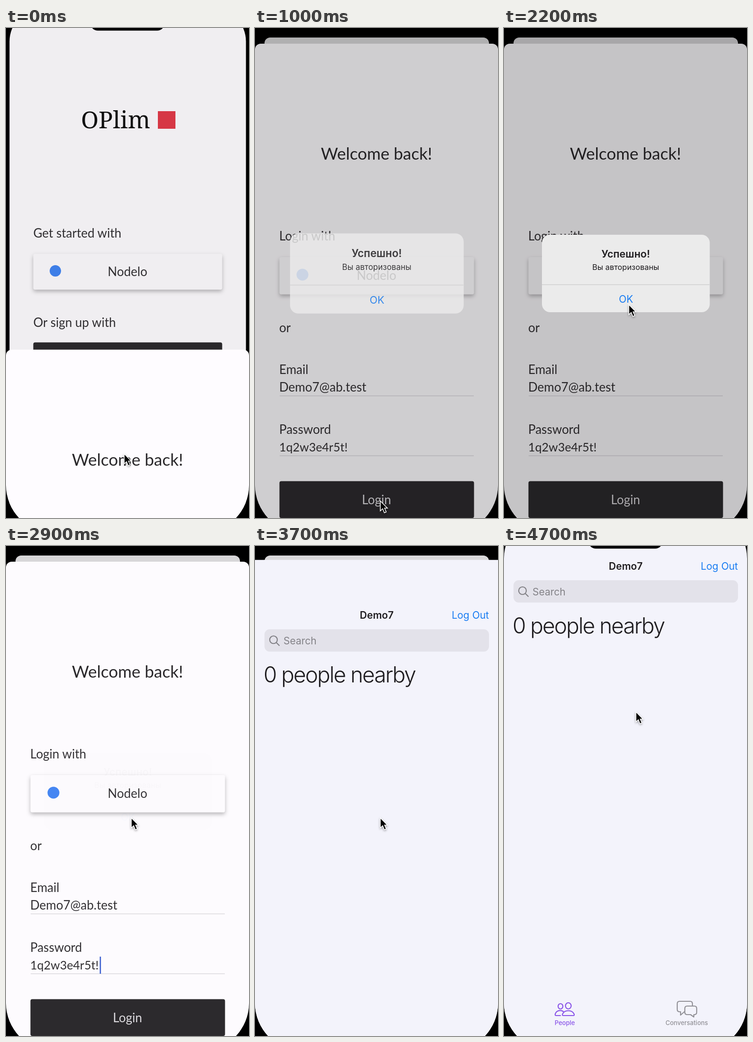
Write an HTML page that moves like this. It is 512 px wide and 1031 px high and loops after 4.8 s.

```html
<!DOCTYPE html>
<html lang="en">
<head>
<meta charset="utf-8">
<title>Chat login</title>
<style>
  html, body { margin: 0; width: 100%; height: 100%; overflow: hidden; background: #000; }
  svg { display: block; width: 100%; height: 100%; }
  text { fill: #1f1d20; }
  .form text { font: 26px Lato, sans-serif; fill: #333134; }
  .form .big { font-size: 35px; fill: #2a282b; }
  .form .logo { font: 50px "Noto Serif", serif; fill: #111; }
  .form .light { fill: #dddbdf; }
  .ui text { font: 21px Inter, sans-serif; }
  .ui .tab { font-size: 13px; font-weight: 500; }
  .ui .head { font-size: 46px; font-weight: 300; letter-spacing: -2px; }
  .ui .bold { font-weight: 600; }
  .ui .title { font-size: 21.6px; }
  .ui .note { font-size: 16.4px; }
  .ui .link { fill: #1a7df2; }
  .mid { text-anchor: middle; }
  .raised { fill: #fefcff; filter: drop-shadow(0 4px 4px rgba(0,0,0,.27)); }
  .dark { fill: #2c2a2d; }
  .rule { stroke: #dddbe0; stroke-width: 1.5; }
  .icon { fill: none; stroke-width: 2.2; stroke-linejoin: round; stroke-linecap: round; }
</style>
</head>
<body>
<svg viewBox="0 0 512 1031" preserveAspectRatio="none">
  <clipPath id="phone"><rect y="-74" width="512" height="1136" rx="100"/></clipPath>
  <rect width="512" height="1031"/>
  <g clip-path="url(#phone)">
    <!-- start page -->
    <rect id="card" fill="#fefcff" height="1200"/>
    <g id="start" class="form">
      <text class="logo" x="158" y="211">OPlim</text>
      <rect x="320" y="175" width="37" height="37" fill="#e23a49"/>
      <text x="57.5" y="441">Get started with</text>
      <rect class="raised" x="57.5" y="475" width="398" height="75.5" rx="4"/>
      <circle cx="104" cy="511" r="12" fill="#4285f4"/>
      <text class="mid" x="256" y="522">Nodelo</text>
      <text x="57.5" y="628.5">Or sign up with</text>
      <rect class="dark" x="57.5" y="661.500" width="398" height="75" rx="4"/>
    </g>
    <rect id="shade" width="512" height="1031"/>

    <!-- login sheet -->
    <g id="sheet" class="form">
      <rect y="33" width="512" height="1100" rx="12" fill="#fefcff"/>
      <text class="big mid" x="256" y="277">Welcome back!</text>
      <text x="51" y="447">Login with</text>
      <rect class="raised" x="51.5" y="482" width="410" height="78.5" rx="4"/>
      <circle cx="100" cy="519" r="12.5" fill="#4285f4"/>
      <text class="mid" x="256" y="530">Nodelo</text>
      <text x="51" y="640">or</text>
      <text x="51" y="728">Email</text>
      <text x="51" y="854">Password</text>
      <g id="filled">
        <text x="51" y="765">Demo7@ab.test</text>
        <text x="51" y="891" style="font-size:25px">1q2w3e4r5t!</text>
      </g>
      <path class="rule" d="M52 774H461M52 900H461"/>
      <rect id="caret" x="197.5" y="864" width="2.6" height="36" fill="#3f63d2"/>
      <rect class="dark" x="51.5" y="953.5" width="410" height="77.500" rx="4"/>
      <text class="light mid" x="256" y="1001.5">Login</text>
    </g>

    <!-- alert -->
    <rect id="dim" width="512" height="1031"/>
    <g id="alert" class="ui">
      <rect x="80" y="435" width="353.5" height="163" rx="17" fill="#ebebeb"/>
      <path d="M80 540H433" stroke="#cfcfd0" stroke-width="1.3"/>
      <text class="bold title mid" x="256.5" y="483">Успешно!</text>
      <text class="note mid" x="256.5" y="509">Вы авторизованы</text>
      <text class="link mid" x="257" y="578">OK</text>
    </g>

    <!-- main screen -->
    <g id="main" class="ui">
      <rect y="-74" width="512" height="1200" fill="#f3f3fb"/>
      <text class="bold mid" x="256.5" y="50">Demo7</text>
      <text class="link" x="493" y="50" text-anchor="end">Log Out</text>
      <rect x="20" y="72" width="473" height="47" rx="11" fill="#e3e2ea"/>
      <g class="icon" stroke="#838287"><circle cx="39" cy="94" r="8"/><path d="M45 100L51 106"/></g>
      <text x="60" y="103.5" style="fill:#838287">Search</text>
      <text class="head" x="18" y="184">0 people nearby</text>
      <g class="icon" stroke="#8a55e8">
        <ellipse cx="119" cy="968.5" rx="5" ry="5.5"/>
        <ellipse cx="135.5" cy="967.5" rx="6" ry="6.5"/>
        <path d="M119 988H110Q107 988 108 984.5C111 976.5 120 976 125 979.5"/>
        <path d="M125 988H146Q149 988 147.5 984.5C143 975.5 128 975.5 123.5 984.5Q122 988 125 988Z"/>
      </g>
      <g class="icon" stroke="#929197">
        <path d="M380 980L372 987V980H370Q365 980 365 975V963Q365 958 370 958H392Q397 958 397 963V968"/>
        <path d="M386 968H401Q406 968 406 973V981Q406 986 401 986H400V991L393 986H386Q381 986 381 981V973Q381 968 386 968Z"/>
      </g>
      <text class="tab mid" x="128" y="1008" style="fill:#8a55e8">People</text>
      <text class="tab mid" x="385" y="1008" style="fill:#929197">Conversations</text>
    </g>
  </g>
  <rect x="177.5" y="-40" width="157" height="45.5" rx="16"/>
  <path id="cursor" d="M0 0V21L5 16.5L8.5 25L12.5 23.3L9 15.3H15Z" stroke="#fff" stroke-width="1.5"
    style="filter:drop-shadow(0 2px 2px rgba(0,0,0,.35))"/>
</svg>
<script>
const LOOP = 4800, STEP = 100, RATE = 12.2, MID = 256.5;
const $ = id => document.getElementById(id);
const set = (id, attrs) => {
  for (const k in attrs) $(id).setAttribute(k, attrs[k]);
};
const mix = (a, b, p) => a + (b - a) * p;
const clamp = v => Math.max(0, Math.min(1, v));
const decay = s => Math.exp(-RATE * s);

// time in seconds, x, y of the pointer tip
const path = [
  [0, 249, 896], [.5, 249, 896], [.8, 264, 995], [1.3, 264, 995], [1.8, 245, 500],
  [2.2, 263, 582], [2.5, 264, 572], [4.1, 264, 572], [4.6, 278, 349], [4.8, 278, 349]
];

function pointer(t) {
  const i = path.findIndex(k => k[0] > t);
  const [t0, x0, y0] = path[i - 1], [t1, x1, y1] = path[i];
  const u = (t - t0) / (t1 - t0), e = u * u * (3 - 2 * u);
  return [mix(x0, x1, e), mix(y0, y1, e)];
}

function draw(t) {
  // the sheet rises while the page behind it shrinks
  const p0 = .355, p = 1 - (1 - p0) * decay(t);
  const width = q => mix(512, 473, q), top = q => mix(-74, 20, q);
  const k = width(p) / width(p0);
  set('card', { x: MID - width(p) / 2, y: top(p), width: width(p), rx: mix(100, 12, p) });
  set('start', { transform: `translate(${MID - MID * k} ${top(p) - top(p0) * k}) scale(${k})` });
  set('shade', { opacity: .15 * p });
  set('sheet', { transform: `translate(0 ${998 * (1 - p)})` });
  set('filled', { opacity: t >= .6 ? 1 : 0 });
  set('caret', { opacity: t >= 2.8 ? 1 : 0 });

  // the alert shrinks in, then only fades out
  const shown = clamp(1 - .175 * decay(t - 1));
  const alpha = shown * Math.min(1, decay(t - 2.55));
  const zoom = 1.2 - .2 * shown;
  set('dim', { opacity: .225 * alpha });
  set('alert', {
    opacity: alpha,
    transform: `translate(${MID} 516.5) scale(${zoom}) translate(${-MID} -516.5)`
  });

  const drop = Math.min(1200, 9 * decay(t - 3.9));
  set('main', { transform: `translate(0 ${drop})` });
  set('cursor', { transform: `translate(${pointer(t)})` });
}

function tick() {
  const ms = performance.now() % LOOP;
  draw(Math.floor(ms / STEP) * STEP / 1000);
  requestAnimationFrame(tick);
}
tick();
</script>
</body>
</html>
```
